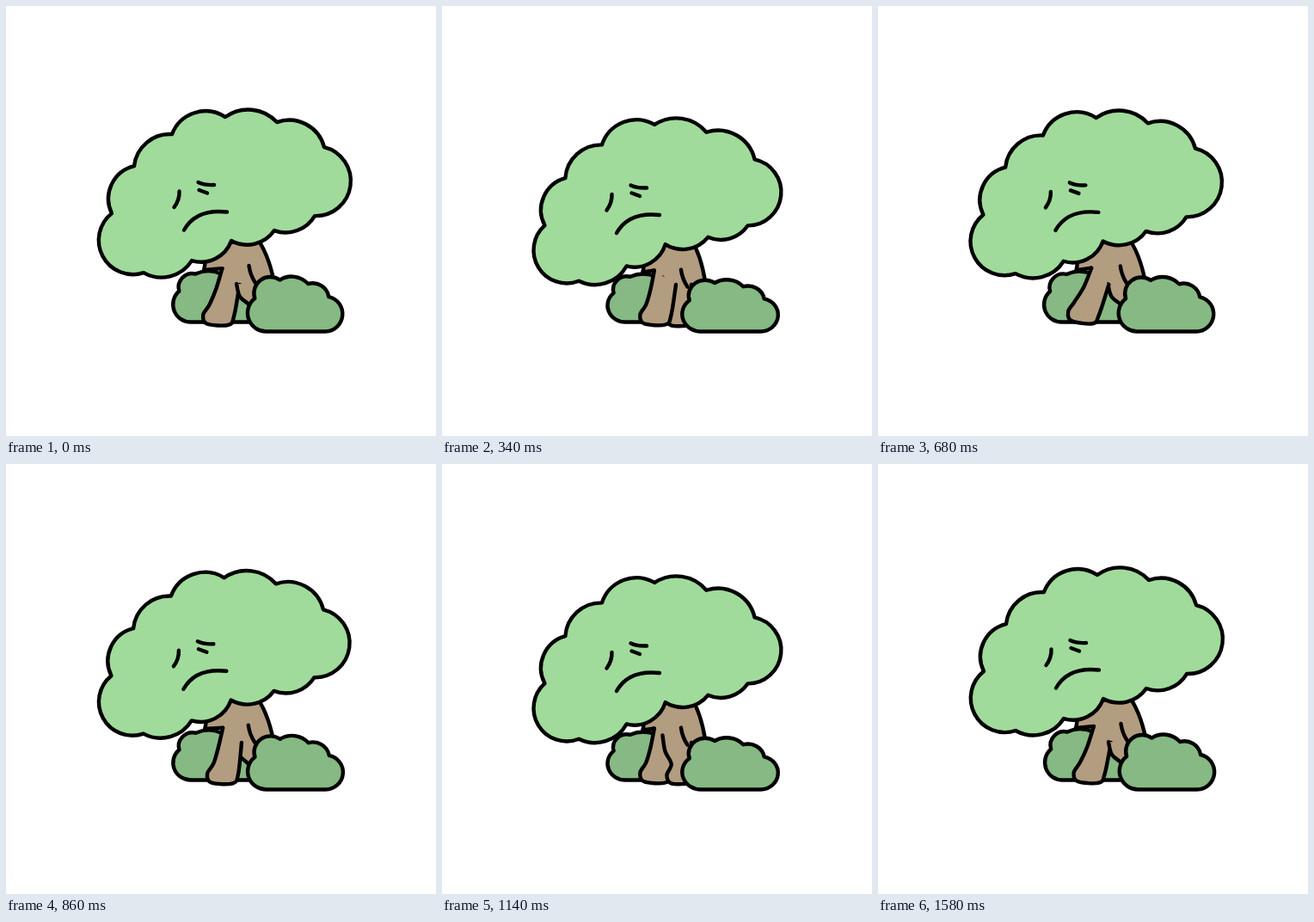
An HTML page that plays this animation: 500 px wide and 500 px high, repeating every 1600 ms.

```html
<!DOCTYPE html>
<html>
<head>
<meta charset="utf-8">
<style>
  html, body { margin: 0; width: 100%; height: 100%; overflow: hidden; background: #fff; }
  svg { display: block; width: 100%; height: 100%; }
  path { stroke: #000; stroke-width: 4.4; stroke-linecap: round; stroke-linejoin: round; fill: none; vector-effect: non-scaling-stroke; }
  .leaf { fill: #a0db9b; }
  .bush { fill: #86b983; }
  .wood { fill: #b39d80; }
  #trunkFill { stroke: none; }
</style>
</head>
<body>
<svg viewBox="0 0 500 500">
  <path id="backBush" class="bush" d="M290 367.5H215A20.5 20.5 0 0 1 201 331.5A16 16 0 0 1 220 311.5A36 36 0 0 1 250 311.5L290 330Z"/>
  <path id="trunkFill" class="wood"/>
  <path id="trunk"/>
  <path id="legB" class="wood"/>
  <path id="legA" class="wood"/>
  <path id="crease"/>
  <path id="frontBush" class="bush" d="M303 378.5A21.5 21.5 0 0 1 289 340A19 19 0 0 1 318 318.5A26 26 0 0 1 351 323A19 19 0 0 1 375 338A20.5 20.5 0 0 1 371 378.5Z"/>
  <path id="canopy" class="leaf"/>
  <path id="face" d="M207 260.5Q221 235.5 257 239.5M201.5 215.5Q202 225 195.5 234M223.5 205Q231 208.5 242 208M224.5 214L234 217.5"/>
</svg>
<script>
const LOOP = 1600, STEP = 800;
const el = id => document.getElementById(id);
const draw = (id, d) => el(id).setAttribute('d', d);
const move = (id, transform) => el(id).setAttribute('transform', transform);

// Canopy notches: x, y, and how far the arc ending there bulges, relative to its chord
const leaves = [
  [193, 149, .2], [255, 129, .24], [315, 135, .19], [370, 164, .22],
  [359, 244, .45], [312, 261, .18], [262, 273, .19], [216, 296, .2],
  [160, 310, .2], [123, 241, .42], [149, 186, .24]
];

// Smooth step from 0 at time a to 1 at time b
function ramp(t, a, b) {
  const u = Math.max(0, Math.min(1, (t - a) / (b - a)));
  return u * u * (3 - 2 * u);
}

// Open smooth curve through points
function curve(points) {
  const at = i => points[Math.max(0, Math.min(points.length - 1, i))];
  const handle = (i, dir) => at(i).map((v, c) => v + dir * (at(i + 1)[c] - at(i - 1)[c]) / 6);
  return 'M' + at(0) + points.slice(1).map((p, i) => `C${handle(i, 1)} ${handle(i + 1, -1)} ${p}`).join('');
}

// Body: quick drop and slow rise, with a lean and a slight bush drift
function bodyAt(t) {
  const p = t % STEP;
  return {
    sag: ramp(p, -10, 180) * (1 - ramp(p, 180, STEP)),
    sway: 1.15 * ramp(p, 0, 240) * (1 - ramp(p, 320, STEP)),
    drift: 1.25 * Math.cos(2 * Math.PI * (p / STEP - .14)) - .5
  };
}

// Leg outline: front edge down, round the foot, back edge up
function legAt(t, { sag, sway }) {
  t %= LOOP;
  // reach: 0 foot in front, 1 foot behind; bend: knee bent in the swing
  const reach = t < 450 ? 1 - ramp(t, 120, 450) : Math.min(1, ((t - 450) / 890) ** 1.5);
  const bend = t < 360 ? Math.sin(Math.PI * t / 360) ** 2 : 0;
  const toeUp = (1 - reach) ** 6, heelUp = reach ** 6;
  const x = 228 + 76 * reach;

  const top = [246 + 22 * reach - 4 * sway - 8 * bend, 304 + 19 * reach ** 2 + 3 * sag - 8 * bend];
  const ankle = [x - 10 - 10 * reach ** 3 - 10 * bend, 349 - 10 * toeUp - 2 * bend];
  const knee = [(top[0] + ankle[0]) / 2 + 2 - 6 * reach, (top[1] + ankle[1]) / 2 + 2];

  const tilt = .3 * toeUp - .6 * heelUp, c = Math.cos(tilt), s = Math.sin(tilt);
  const footX = x + 8 * bend, footY = 370 - 10 * toeUp - 12 * heelUp - 14 * bend;
  const foot = [[-18, -8], [-13, 2], [12, 2], [18, -9]]
    .map(([u, v]) => [footX + u * c - v * s, footY + u * s + v * c]);

  return [top, knee, ankle, ...foot, [267 + 30 * ramp(reach, 0, 1), 324]];
}

function drawCanopy({ sag, sway }) {
  const points = leaves.map(([x, y]) => {
    const height = 273 - y;
    return [x - sway * (2 + height / 30), y + sag * (5 + height / 28 + .078 * Math.abs(x - 262))];
  });
  const arcs = points.map((p, i) => {
    const [x, y] = points.at(i - 1), bulge = leaves[i][2];
    const r = Math.hypot(p[0] - x, p[1] - y) * (bulge / 2 + 1 / (8 * bulge));
    return `A${r} ${r} 0 0 1 ${p}`;
  });
  draw('canopy', `M${points.at(-1)}${arcs.join('')}Z`);
}

function render(t) {
  const body = bodyAt(t), { sag, sway, drift } = body;
  const squash = (id, x, y) => move(id,
    `translate(${x + drift} ${y}) scale(${1 + .012 * sag} ${1 - .07 * sag}) translate(${-x} ${-y})`);
  squash('backBush', 260, 367.5);
  squash('frontBush', 337, 378.5);

  const a = legAt(t, body), b = legAt(t + STEP, body);
  draw('legA', curve(a));
  draw('legB', curve(b));

  const [lead, rear] = a[0][0] < b[0][0] ? [a, b] : [b, a];
  const left = 4 * sag, low = 3 * sag;
  const trunk = `M${lead[0]}L${230 + left} ${307 + low}Q${232 + left} ${300 + low} ${232 + left} 285`
    + `L289 ${266 + 5 * sag}Q${305 - 3 * sway} ${286 + 5 * sag} ${312 - 5 * sway} 322`;
  draw('trunk', trunk);
  draw('trunkFill', `${trunk}L${rear[7]}L${rear[1]}Z`);

  draw('crease', 'M282.5 302Q284 313 290 322');
  move('crease', `translate(${-4 * sway} ${5.5 * sag})`);
  move('face', `translate(${-3.5 * sway} ${4.2 * sag})`);
  drawCanopy(body);
}

function frame() {
  render(Math.floor(performance.now() / 20) * 20 % LOOP);
  requestAnimationFrame(frame);
}
frame();
</script>
</body>
</html>
```
